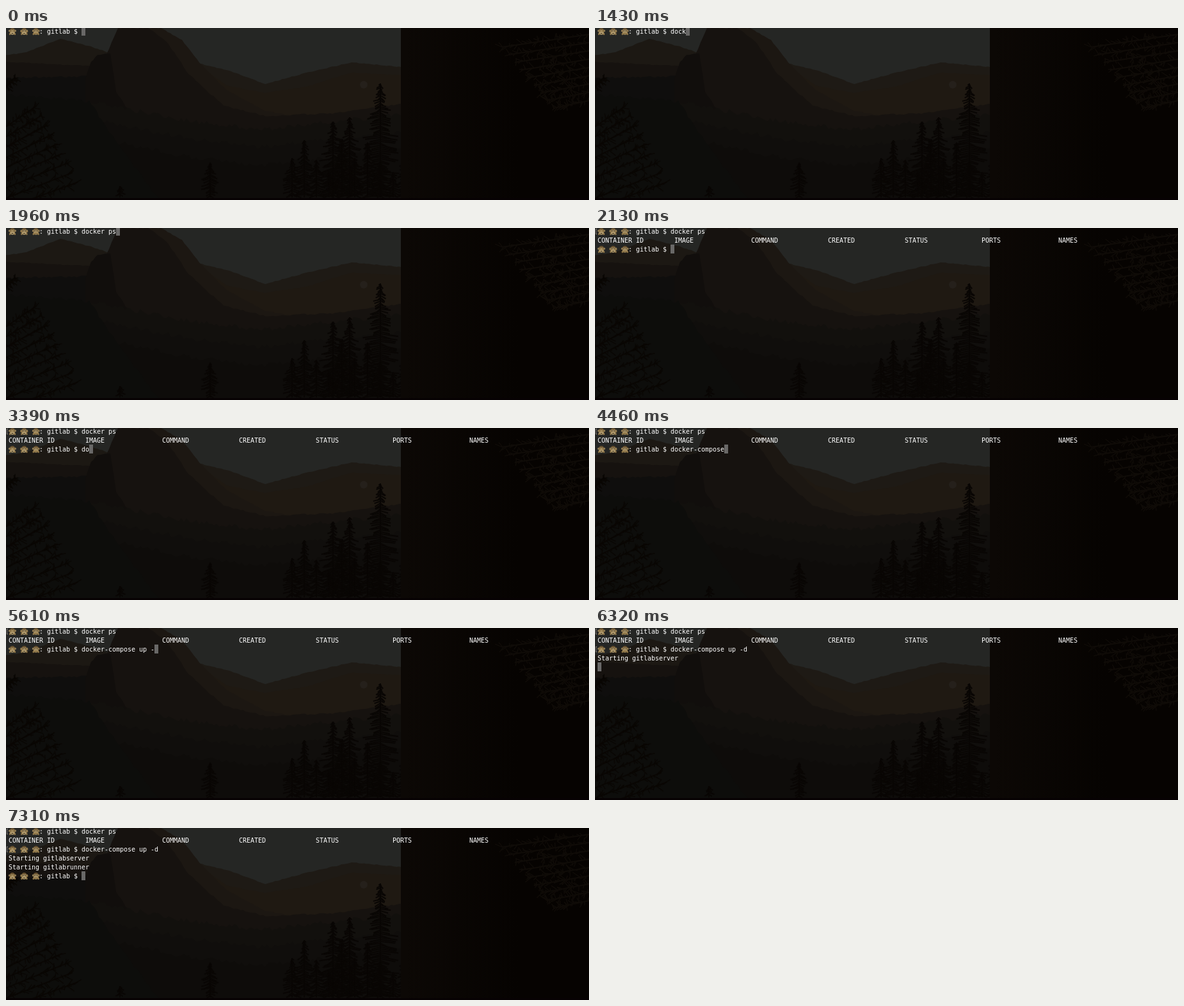
Write an HTML page with a canvas that moves like this. It is 911 px wide and 270 px high and loops after 8000 ms.

```html
<!DOCTYPE html>
<html lang="en">
<head>
<meta charset="utf-8">
<title>Terminal session</title>
<style>
html, body { margin: 0; width: 100%; height: 100%; overflow: hidden; background: #080503; }
canvas { display: block; }
</style>
</head>
<body>
<canvas id="stage" width="911" height="270"></canvas>
<script>
const W = 911, H = 270, LOOP = 8000;
const CELL = 6, LINE = 14, LEFT = 4, KEY_GAP = 86;
const stage = document.getElementById('stage').getContext('2d');

let seed = 11;
function rand(from = 0, to = 1) {
  seed = (seed * 16807) % 2147483647;
  return from + (to - from) * seed / 2147483647;
}

// ---------- scenery ----------
function line(c, x0, y0, x1, y1, width = 1) {
  c.lineWidth = width;
  c.beginPath();
  c.moveTo(x0, y0);
  c.lineTo(x1, y1);
  c.stroke();
}

// fills everything below a slightly rough line through the key points
function ridge(c, fill, rough, ...pts) {
  c.fillStyle = fill;
  c.beginPath();
  c.moveTo(pts[0][0], H);
  pts.forEach(([x, y], i) => {
    const [px, py] = pts[Math.max(0, i - 1)];
    const steps = Math.ceil((x - px) / 4) || 1;
    for (let k = 1; k <= steps; k++)
      c.lineTo(px + (x - px) * k / steps, py + (y - py) * k / steps + rand(-rough, rough));
  });
  c.lineTo(pts[pts.length - 1][0], H);
  c.fill();
}

function tree(c, x, top) {
  const height = H - 4 - top;
  const half = 8 + 0.12 * height;
  c.strokeStyle = '#090604';
  line(c, x, top, x, top + height, 2);
  for (let y = top + 3; y < top + height; y += 3) {
    const reach = half * Math.min(1, 0.15 + 1.8 * (y - top) / height);
    for (const side of [-1, 1])
      line(c, x, y - 2, x + side * reach * rand(0.3, 1), y + rand(0, 4), 2);
  }
}

// a bough with needles fanning out along its length
function bough(c, color, x0, y0, x1, y1) {
  c.strokeStyle = color;
  line(c, x0, y0, x1, y1, 2);
  for (let i = 0; i < 45; i++) {
    const k = rand();
    const x = x0 + (x1 - x0) * k, y = y0 + (y1 - y0) * k;
    line(c, x, y, x + rand(-2, 12) * Math.sign(x1 - x0), y + rand(-10, 9), 1.4);
  }
}

function makeScenery() {
  const cv = document.createElement('canvas');
  cv.width = W;
  cv.height = H;
  const c = cv.getContext('2d');
  c.fillStyle = '#252624';
  c.fillRect(0, 0, W, H);

  // hills on the left
  ridge(c, '#1c1813', 0.6, [0, 43], [32, 38], [85, 17], [132, 29], [165, 40]);
  ridge(c, '#16120f', 0.6, [0, 53], [80, 57], [180, 62]);
  ridge(c, '#0f0e0d', 1.5, [0, 78], [130, 76], [190, 120]);

  // valley ridges
  ridge(c, '#1e1a15', 0.6, [295, 54], [352, 68], [405, 88], [470, 70], [540, 54], [626, 62]);
  ridge(c, '#1f1912', 0.6, [295, 54], [345, 90], [403, 102], [470, 92], [540, 70], [626, 74]);

  // dome with its darker inner face and shoulder
  ridge(c, '#1c1712', 0.6, [158, 40], [175, 0], [242, 0], [275, 19], [302, 54], [345, 98], [405, 130], [460, 140]);
  ridge(c, '#16120f', 1.2, [158, 40], [175, 0], [222, 0], [252, 22], [285, 72], [340, 122], [405, 138], [510, 134], [626, 118]);
  ridge(c, '#110e0c', 1.2, [124, 80], [133, 53], [143, 42], [163, 39], [172, 100], [205, 150]);

  // forest floor darkens layer by layer
  ['#12100d', '#100e0c', '#0e0c0a'].forEach((fill, i) => {
    const y = 135 + i * 28;
    ridge(c, fill, 4, [130, y - 20], [290, y + 12], [400, y + 24], [626, y]);
  });
  ridge(c, '#0d0d0b', 3, [0, 105], [130, 115], [180, 190], [240, H]);

  c.fillStyle = '#25201b';
  c.beginPath();
  c.arc(559, 89, 6, 0, Math.PI * 2);
  c.fill();

  for (const [x, top] of [[585, 87], [511, 147], [537, 140], [466, 176], [447, 204], [319, 211], [178, 248]])
    tree(c, x, top);
  for (let x = 485; x < 626; x += 20) tree(c, x, rand(170, 235));

  // cliff on the right
  const rock = c.createLinearGradient(625, 0, 800, 0);
  rock.addColorStop(0, '#0c0805');
  rock.addColorStop(1, '#060301');
  ridge(c, rock, 1, [617, 0], [625, 4]);
  c.fillStyle = rock;
  c.fillRect(617, 0, 8, 5);
  c.fillRect(625, 0, W, H);
  c.clearRect(617, 5, 8, 0);
  for (let i = 0; i < 9; i++) {
    bough(c, '#100c08', W, 10 + i * 13, 775 + i * 10, 30 + i * 12);
    bough(c, '#0a0704', 0, 155 + i * 16, 48 + i * 8, 122 + i * 15);
  }
  bough(c, '#0a0704', 0, 92, 14, 78);

  c.fillStyle = '#070203';
  c.fillRect(0, H - 3, W, 3);
  return cv;
}

// ---------- terminal ----------
function text(str, col, row) {
  stage.fillStyle = '#fff';
  [...str].forEach((ch, i) => stage.fillText(ch, LEFT + (col + i) * CELL, row * LINE + 9));
}

function oval(color, x, y, rx, ry) {
  stage.fillStyle = color;
  stage.beginPath();
  stage.ellipse(x, y, rx, ry, 0, 0, Math.PI * 2);
  stage.fill();
}

function pair(color, x, y, dx, rx, ry) {
  oval(color, x - dx, y, rx, ry);
  oval(color, x + dx, y, rx, ry);
}

// pose: 0 covers the eyes, 1 the ears, 2 the mouth
function monkey(x, y, pose) {
  const fur = '#66502f', skin = '#b09a6c', paw = '#8f7648', ink = '#2b2015';
  pair(skin, x, y - 1, 4.5, 1.3, 1.8);
  oval(fur, x, y - 0.5, 4.6, 5);
  pair(skin, x, y - 1, 1.6, 1.9, 2);
  oval(skin, x, y + 2.2, 3.8, 2.8);
  if (pose) pair(ink, x, y - 1, 1.6, 0.7, 0.9);
  if (pose < 2) oval(ink, x, y + 3, 1.5, 0.6);
  const [dx, dy] = [[2.2, -1], [4.2, 0], [1.4, 3]][pose];
  pair(paw, x, y + dy, dx, 1.8, 1.6);
  pair(paw, x, y + 4, 4, 1.2, 1.8);
}

function prompt(row, command, done) {
  for (let i = 0; i < 3; i++) monkey(10 + i * 18.4, row * LINE + 5.5, i);
  text(': gitlab $ ' + command, 8, row);
  if (done) {
    stage.strokeStyle = '#77736f';
    stage.lineWidth = 1;
    stage.strokeRect(1.5, row * LINE + 1.5, 0, 8);
    stage.fillStyle = '#77736f';
    for (const y of [1, 9]) stage.fillRect(1, row * LINE + y, 2, 1);
  }
}

function cursor(col, row) {
  stage.fillStyle = '#696867';
  stage.fillRect(LEFT + col * CELL, row * LINE - 2, CELL, LINE);
}

// bursts: start time and the keys that follow at a steady gap
const COMMANDS = [
  { row: 0, start: 0, enter: 2130,
    bursts: [[1080, 'd', 'o', 'c'], [1430, 'k', 'er', ' '], [1780, 'p'], [1960, 's']] },
  { row: 2, start: 2130, enter: 5970,
    bursts: [[3390, 'do', 'c'], [3650, 'k', 'er'], [4010, '-'], [4190, 'c'], [4460, 'ompose'],
      [5180, ' '], [5350, 'u', 'p', ' ', '-'], [5790, 'd']] },
  { row: 5, start: 7310, enter: Infinity, bursts: [] }
];
const HEADS = ['CONTAINER ID', 'IMAGE', 'COMMAND', 'CREATED', 'STATUS', 'PORTS', 'NAMES'];
const OUTPUT = [[6320, 'Starting gitlabserver'], [6770, 'Starting gitlabrunner']];

function typed(bursts, t) {
  return bursts.map(([at, ...keys]) =>
    keys.filter((_, i) => t >= at + i * KEY_GAP).join('')).join('');
}

function drawCommand({ row, start, enter, bursts }, t) {
  if (t < start) return;
  const str = typed(bursts, t);
  if (t < enter) cursor(19 + str.length, row);
  prompt(row, str, t >= enter);
}

const scenery = makeScenery();

function draw(t) {
  const [list, up, next] = COMMANDS;
  stage.drawImage(scenery, 0, 0);
  stage.font = '10px "DejaVu Sans Mono", monospace';
  COMMANDS.forEach(cmd => drawCommand(cmd, t));
  if (t >= list.enter) HEADS.forEach((head, i) => text(head, i * 20, 1));
  const lines = OUTPUT.filter(([at]) => t >= at);
  lines.forEach(([, str], i) => text(str, 0, 3 + i));
  if (t >= up.enter && t < next.start) cursor(0, 3 + lines.length);
}

function tick() {
  draw(performance.now() % LOOP);
  requestAnimationFrame(tick);
}
tick();
</script>
</body>
</html>
```
